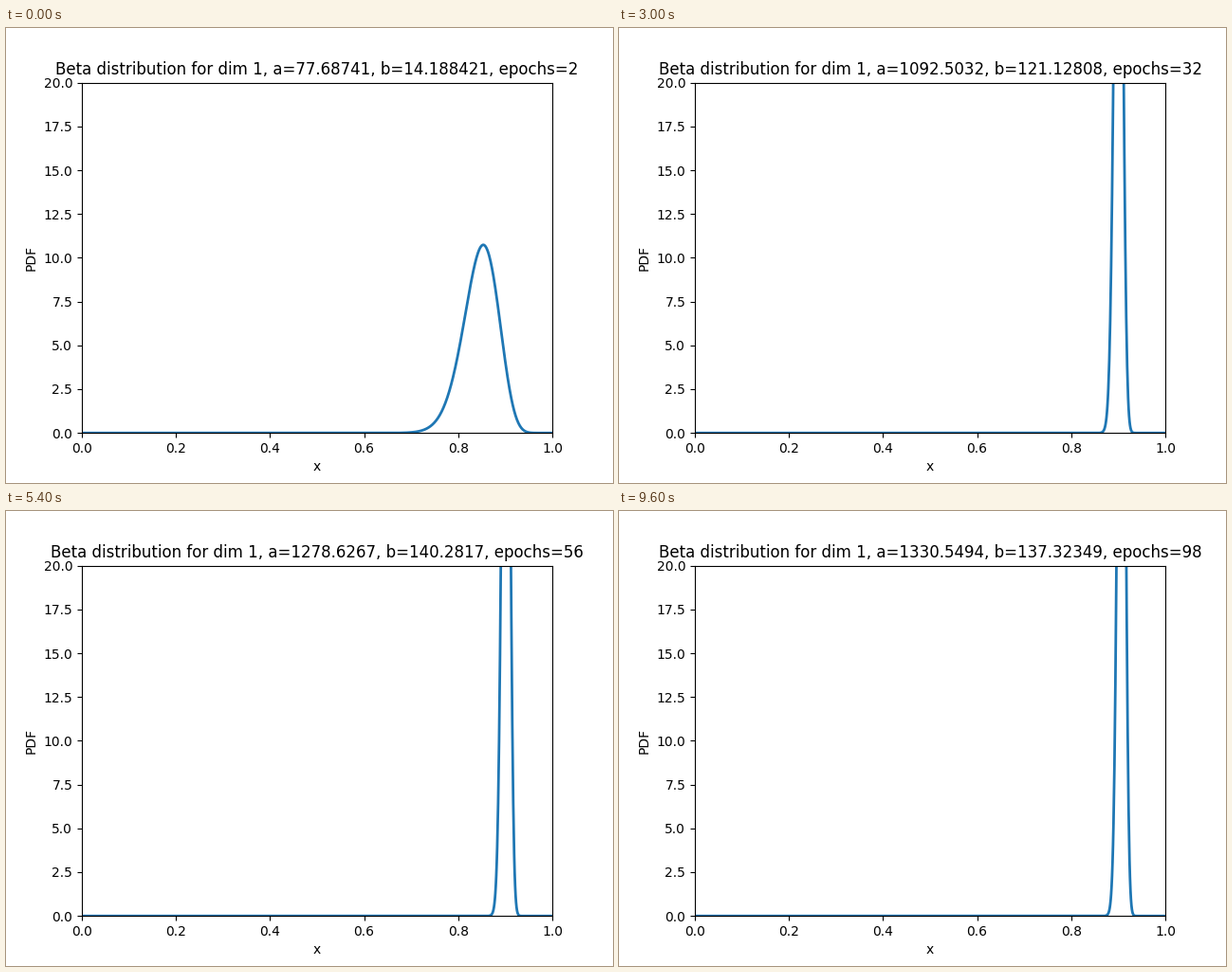
A matplotlib script that plays this animation: 640x480 px, repeating every 9800 ms.

```python
from math import lgamma

import matplotlib.pyplot as plt
import numpy as np
from matplotlib.animation import FuncAnimation

FRAMES = 49
INTERVAL = 200

# Training checkpoints: epoch and the two Beta parameters reached there
EPOCHS = np.array([2, 22, 40, 56, 66, 82, 98])
A = np.array([77.68741, 862.8474, 1202.568, 1278.6267, 1314.9127, 1324.2455, 1330.5494])
B = np.array([14.188421, 87.12815, 136.61647, 140.2817, 134.931, 137.53905, 137.32349])


def monotone_slopes(x, y):
    """Harmonic-mean slopes, flat at turning points, so the curve never overshoots."""
    d = np.diff(y) / np.diff(x)
    inner = [2 * p * q / (p + q) if p * q > 0 else 0.0 for p, q in zip(d, d[1:])]
    return np.array([d[0], *inner, d[-1]])


def hermite(x, y, m, t):
    i = min(np.searchsorted(x, t, side="right") - 1, len(x) - 2)
    h = x[i + 1] - x[i]
    s = (t - x[i]) / h
    rise = s * s * (3 - 2 * s)
    return ((1 - rise) * y[i] + rise * y[i + 1]
            + h * s * (1 - s) * ((1 - s) * m[i] - s * m[i + 1]))


def beta_pdf(x, a, b):
    log_norm = lgamma(a + b) - lgamma(a) - lgamma(b)
    return np.exp(log_norm + (a - 1) * np.log(x) + (b - 1) * np.log1p(-x))


slopes_a = monotone_slopes(EPOCHS, A)
slopes_b = monotone_slopes(EPOCHS, B)
xs = np.linspace(1e-9, 1 - 1e-9, 1000)

fig, ax = plt.subplots(figsize=(6.4, 4.8), dpi=100)
ax.set(xlim=(0, 1), ylim=(0, 20), xlabel="x", ylabel="PDF")
line, = ax.plot([], [], color="#1f77b4", lw=2)
title = ax.set_title("")


def update(frame):
    epoch = 2 * (frame + 1)
    a = np.float32(hermite(EPOCHS, A, slopes_a, epoch))
    b = np.float32(hermite(EPOCHS, B, slopes_b, epoch))
    line.set_data(xs, beta_pdf(xs, float(a), float(b)))
    title.set_text(f"Beta distribution for dim 1, a={str(a)}, b={str(b)}, epochs={epoch}")
    return line, title


anim = FuncAnimation(fig, update, frames=FRAMES, init_func=lambda: update(0),
                     interval=INTERVAL, repeat=True, repeat_delay=0)
plt.show()
```
